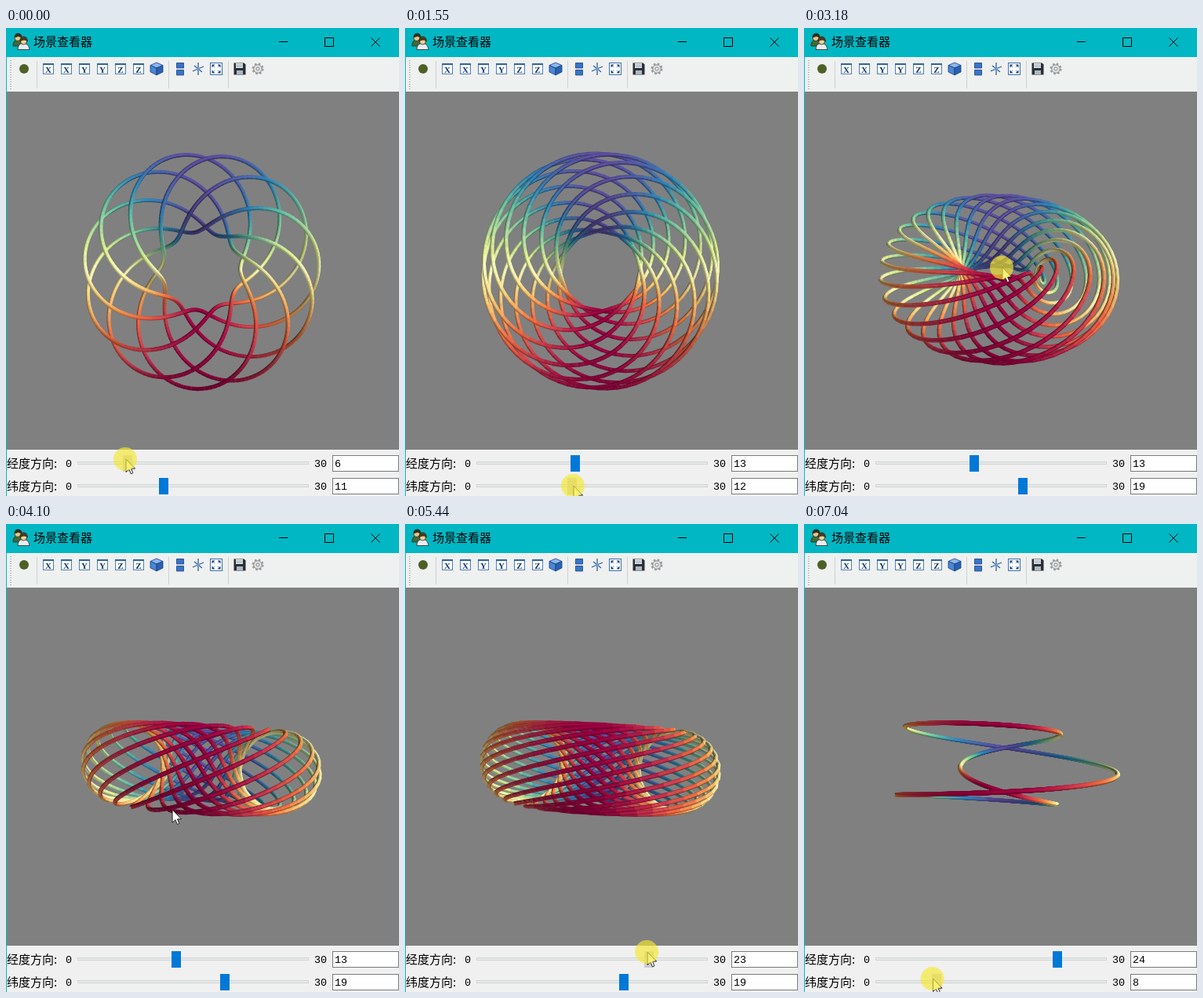
These frames come from a looping animation (501x596 px, 7120 ms). An HTML page with a canvas:

```html
<!DOCTYPE html>
<html lang="zh">
<head>
<meta charset="utf-8">
<title>场景查看器</title>
<style>
html, body { margin: 0; width: 100%; height: 100%; overflow: hidden; background: #f0f0f0; }
canvas { position: absolute; left: 1px; top: 81px; }
svg { position: absolute; left: 0; top: 0; }
text { font-family: "Noto Sans CJK SC", "Noto Sans CJK", sans-serif; fill: #000; }
.num { font: 13.4px "Liberation Mono", monospace; }
.axis { font: bold 11px "Liberation Serif", serif; fill: #14366f; text-anchor: middle; }
</style>
</head>
<body>
<canvas id="view" width="500" height="456"></canvas>
<svg width="501" height="596" viewBox="0 0 501 596">
  <rect width="501" height="37" fill="#00b7c3"/>
  <rect y="37" width="501" height="44" fill="#eff0f0"/>
  <rect y="537" width="501" height="59" fill="#f0f0f0"/>
  <path d="M.5 37V596" stroke="#00b7c3"/>

  <g stroke="#2b2a1c" stroke-width=".8">
    <path d="M9 23q0-8 6-8t7 8z" fill="#3d6b3a"/>
    <circle cx="15" cy="12.500" r="4" fill="#e8c48b"/>
    <path d="M11 12q0-5 4.500-5t4.500 5q-4-3-9 0z" fill="#2c2a20"/>
    <path d="M15 27.500q0-8 7-8t8 8z" fill="#e9edf2"/>
    <circle cx="22.500" cy="17" r="4" fill="#f0cf9c"/>
    <path d="M18 17q0-6 4.500-6t5 6q-4-4-9.500 0z" fill="#4d3b1c"/>
  </g>
  <text x="35" y="23" font-size="15">场景查看器</text>
  <path d="M348 17.500h11M406.500 12.500h11v11h-11zM465.500 12.500l11 11m0-11l-11 11" fill="none" stroke="#000"/>

  <path d="M6 41V79" stroke="#b4b4b4" stroke-width="2" stroke-dasharray="1 2"/>
  <path d="M39.500 42V77M207.500 42V77M283.500 42V77" stroke="#cfd0d0"/>
  <circle cx="23" cy="52" r="6" fill="#4d6026"/>
  <g id="axes"></g>
  <g stroke="#173f80" stroke-width=".8">
    <path d="M192 44l8 3.500-8 3.500-8-3.500z" fill="#8bb8ee"/>
    <path d="M184 47.500l8 3.500v9l-8-4z" fill="#4b86d2"/>
    <path d="M200 47.500l-8 3.500v9l8-4z" fill="#2b61b0"/>
    <path d="M217.500 44.500h9v6.500h-9zM217.500 53.500h9v6.500h-9z" fill="#3a74c6"/>
  </g>
  <path d="M245 44V60M238 55l14-6M240 48l10 8" stroke="#2d5f9c" stroke-width="1.300"/>
  <circle cx="245" cy="52" r="2" fill="#64a0dc"/>
  <rect x="260.500" y="44.500" width="15" height="15" fill="#fff" stroke="#3c6ea8"/>
  <path d="M262.500 50.500v-4h4zM273.500 50.500v-4h-4zM262.500 53.500v4h4zM273.500 53.500v4h-4z" fill="#173f80"/>
  <path d="M264 48l8 8m0-8l-8 8" stroke="#4b7fbd" stroke-dasharray="3 5.300 4"/>
  <path d="M290.500 44.500h13l2 2v13h-15z" fill="#2a2f36"/>
  <path d="M293 45h9v6h-9z" fill="#dfe5ea"/>
  <path d="M294 54h8v5h-8z" fill="#aeb8c0"/>
  <path d="M293.500 47h8M293.500 49h8" stroke="#8d979f" stroke-width=".8"/>
  <circle cx="321" cy="52" r="6.300" fill="none" stroke="#999c9e" stroke-width="2.500" stroke-dasharray="2.500 2.450"/>
  <circle cx="321" cy="52" r="5.300" fill="#dcdedf" stroke="#8c8f91"/>
  <circle cx="321" cy="52" r="2" fill="#f2f2f2" stroke="#8c8f91"/>

  <g id="rows"></g>
  <path id="arrow" d="M0 0V16.500L3.800 13 6.300 18.800 8.800 17.700 6.400 12.100H11.500Z" fill="#fff" stroke="#111" stroke-width=".9"/>
  <circle id="halo" cx="-1" r="15" fill="#f4e82f" fill-opacity=".66"/>
</svg>
<script>
const $ = id => document.getElementById(id);
const ctx = $("view").getContext("2d");
const LOOP = 7120, STEP = LOOP / 92;
const FOCAL = 849, DIST = 8.52, RADIUS = 0.025, POINTS = 1000;
const PIVOT = 0.0163; // x of the point the camera looks at

// key, left fill and right fill lights: direction and strength
const LIGHTS = [[0.5, 0.707, 0.5, 1], [-0.75, -0.5, 0.433, 0.6], [0.75, -0.5, 0.433, 0.5]];
const SPECTRAL = "9e0142 d53e4f f46d43 fdae61 fee08b ffffbf e6f598 abdda4 66c2a5 3288bd 5e4fa2"
  .split(" ").map(h => [0, 2, 4].map(i => parseInt(h.slice(i, i + 2), 16)));

// pointer path: time, x, y
const PATH = [
  [0, 153, 549], [60, 153, 549], [620, 215, 549], [760, 215, 549], [1240, 203, 577],
  [1390, 203, 582], [1548, 215, 583], [2090, 281, 580], [2240, 281, 580], [2554, 260, 556],
  [2870, 247, 432], [2900, 247, 432], [3173, 253, 305], [3560, 245, 155], [3700, 245, 155],
  [3870, 235, 230], [3980, 235, 230], [4102, 212, 364], [4640, 216, 545], [4760, 216, 545],
  [5415, 309, 545], [5600, 321, 545], [5680, 321, 545], [6030, 275, 588], [6620, 275, 588],
  [7040, 164.600, 579]
];
const PRESSES = [[0, 740], [1390, 2220], [2900, 3990], [4790, 5660], [6255, LOOP]];
const TURN = [2900, 3980];

$("axes").innerHTML = [..."XXYYZZ"].map((c, i) => {
  const x = 54 + 23 * i;
  return `<rect x="${x - 6.5}" y="45.500" width="13" height="13" fill="#fff" stroke="#4b7fbd"/>
    <path d="M${x - 7} 46h14" stroke="#2d62a8" stroke-width="2"/><text class="axis" x="${x}" y="56.500">${c}</text>`;
}).join("");

$("rows").innerHTML = ["经度方向:", "纬度方向:"].map((label, i) => {
  const y = 554 + 29 * i;
  return `<text x="1" y="${y + 5.5}" font-size="15">${label}</text>
    <text class="num" x="76" y="${y + 5}">0</text><text class="num" x="393" y="${y + 5}">30</text>
    <rect x="91.500" y="${y - 1.5}" width="294" height="3" fill="#e7eaea" stroke="#d2d4d4"/>
    <rect id="knob${i}" y="${y - 10}" width="12" height="21"/>
    <rect x="416.500" y="${y - 9.5}" width="84" height="20" fill="#fff" stroke="#7a7a7a"/>
    <text class="num" id="value${i}" x="419" y="${y + 5}"></text>`;
}).join("");

function pointer(t) {
  let i = 1;
  while (i < PATH.length - 1 && PATH[i][0] < t) i++;
  const [t0, x0, y0] = PATH[i - 1], [t1, x1, y1] = PATH[i];
  const u = Math.min(1, (t - t0) / (t1 - t0));
  return [x0 + (x1 - x0) * u, y0 + (y1 - y0) * u];
}

// trackball: turn the three axes by each small pointer move
function orientation(t) {
  const axes = [[1, 0, 0], [0, 1, 0], [0, 0, 1]];
  const end = Math.min(t, TURN[1]);
  let [px, py] = pointer(TURN[0]);
  for (let s = TURN[0]; s < end;) {
    s = Math.min(s + 10, end);
    const [x, y] = pointer(s);
    const a = (x - px) * 0.4 * Math.PI / 180, b = (py - y) * 0.44 * Math.PI / 180;
    for (const v of axes) {
      const vx = v[0] * Math.cos(a) + v[2] * Math.sin(a);
      const vz = v[2] * Math.cos(a) - v[0] * Math.sin(a);
      const vy = v[1];
      v[0] = vx;
      v[1] = vy * Math.cos(b) + vz * Math.sin(b);
      v[2] = vz * Math.cos(b) - vy * Math.sin(b);
    }
    px = x; py = y;
  }
  return axes;
}

const dot = (a, b) => a[0] * b[0] + a[1] * b[1] + a[2] * b[2];
const unit = a => { const l = Math.hypot(...a) || 1; return a.map(v => v / l); };
const cross = (a, b) => [a[1] * b[2] - a[2] * b[1], a[2] * b[0] - a[0] * b[2], a[0] * b[1] - a[1] * b[0]];

function hue(v) {
  const p = (v + 1) * 5, i = Math.min(9, Math.floor(p));
  return SPECTRAL[i].map((c, k) => c + (SPECTRAL[i + 1][k] - c) * (p - i));
}
const shade = (c, l) => `rgb(${c.map(v => Math.round(v * Math.min(1, l)))})`;
const lit = n => LIGHTS.reduce((sum, l) => sum + l[3] * Math.max(0, dot(n, l)), 0);

function knot(mer, lon, axes) {
  const list = [];
  for (let i = 0; i < POINTS; i++) {
    const f = 2 * Math.PI * i / (POINTS - 1);
    const r = 1 + 0.5 * Math.cos(lon * f);
    const p = [r * Math.cos(mer * f) - PIVOT, r * Math.sin(mer * f), 0.5 * Math.sin(lon * f)];
    const v = [0, 1, 2].map(k => p[0] * axes[0][k] + p[1] * axes[1][k] + p[2] * axes[2][k]);
    const s = FOCAL / (DIST - v[2]);
    list.push({ v, s, x: 249.5 + v[0] * s, y: 228.5 - v[1] * s, c: Math.sin(mer * f) });
  }
  return list;
}

function line(p, q, ox, oy, ex, ey, width, color) {
  ctx.lineWidth = width;
  ctx.strokeStyle = color;
  ctx.beginPath();
  ctx.moveTo(p.x + ox - ex, p.y + oy - ey);
  ctx.lineTo(q.x + ox + ex, q.y + oy + ey);
  ctx.stroke();
}

function tube(p, q) {
  const along = unit(q.v.map((v, k) => v - p.v[k]));
  const eye = unit([-p.v[0], -p.v[1], DIST - p.v[2]]);
  const side = unit(cross(along, eye)), face = cross(side, along);
  const r = RADIUS * p.s, color = hue((p.c + q.c) / 2);
  const len = Math.hypot(q.x - p.x, q.y - p.y) || 1;
  const ex = (q.x - p.x) / len * 0.6, ey = (q.y - p.y) / len * 0.6;
  // strips across the width, overlapping inwards so that no seam shows
  for (const o of [-0.75, 0.75, -0.4, 0.4, 0]) {
    const tilt = o * 1.2, h = Math.sqrt(1 - tilt * tilt);
    const n = side.map((v, k) => v * tilt + face[k] * h);
    line(p, q, side[0] * o * r, -side[1] * o * r, ex, ey, 0.5 * r, shade(color, lit(n)));
  }
}

function drawKnot(mer, lon, axes) {
  ctx.fillStyle = "#808080";
  ctx.fillRect(0, 0, 500, 456);
  const pts = knot(mer, lon, axes);
  pts.slice(1)
    .map((q, i) => [pts[i], q, pts[i].v[2] + q.v[2]])
    .sort((a, b) => a[2] - b[2])
    .forEach(([p, q]) => tube(p, q));
}

function knobs(t, x) {
  return [
    t < 740 ? x + 2 : t < 4790 ? 217 : t < 5660 ? x + 1.5 : 322.5,
    t < 1390 ? 201 : t < 2220 ? x - 2 : t < 6620 ? 279 : x + 4
  ];
}

let scene = "";
function render(t) {
  const [x, y] = pointer(t);
  const down = PRESSES.some(([a, b]) => t >= a && t < b);
  const at = knobs(t, x);
  const counts = at.map(k => Math.round((k - 97) / 9.47));
  at.forEach((k, i) => {
    const over = Math.abs(x - k) <= 6 && Math.abs(y - 554 - 29 * i) <= 11;
    $("knob" + i).setAttribute("x", Math.round(k - 6));
    $("knob" + i).setAttribute("fill", !over ? "#0078d7" : down ? "#ccc" : "#171717");
    $("value" + i).textContent = counts[i];
  });
  const place = `translate(${x} ${y})`;
  $("halo").setAttribute("transform", place);
  $("halo").style.display = down ? "" : "none";
  $("arrow").setAttribute("transform", place);
  const axes = orientation(t), key = counts + "|" + axes;
  if (key !== scene) drawKnot(...counts, axes);
  scene = key;
}

let shown = -1;
const start = performance.now();
function tick() {
  const t = (performance.now() - start) % LOOP;
  const n = Math.min(91, Math.floor((t + 6) / STEP));
  if (n !== shown) render(n * STEP);
  shown = n;
  requestAnimationFrame(tick);
}
tick();
</script>
</body>
</html>
```
